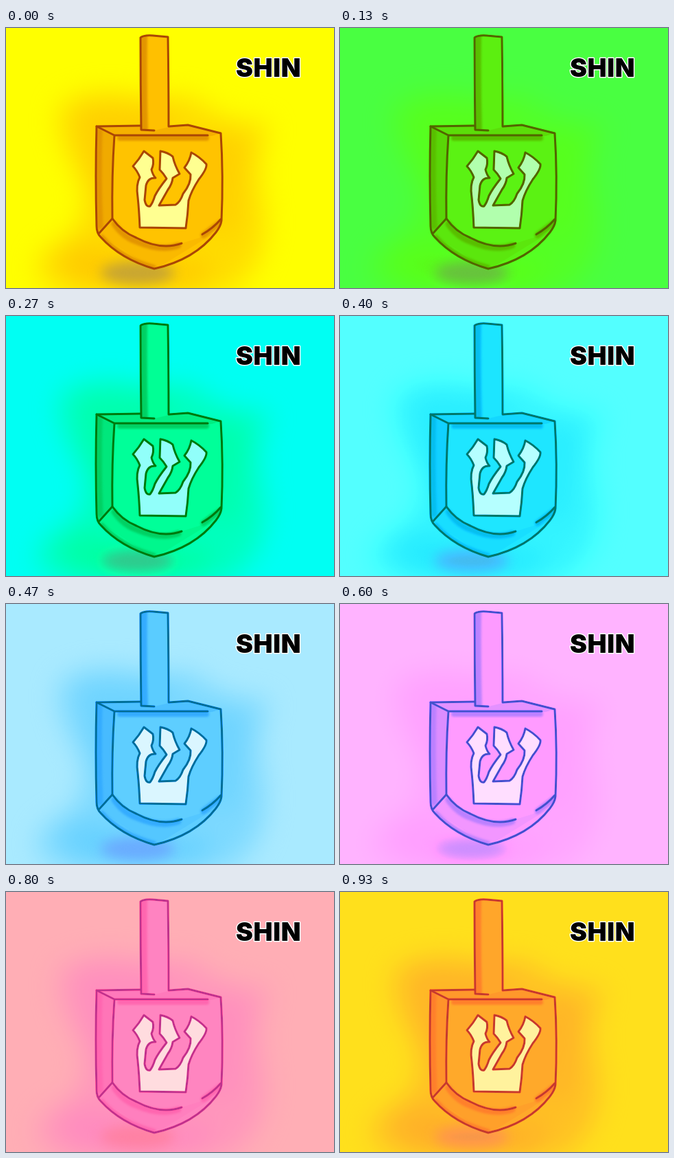
An HTML page for the animation above (0.99 s loop, 478 by 378 pixels).

```html
<!DOCTYPE html>
<html lang="en">
<head>
<meta charset="utf-8">
<title>Shin</title>
<style>
  html, body { margin: 0; width: 100%; height: 100%; overflow: hidden; background: #ff0; }
  svg { display: block; width: 478px; height: 378px; animation: hue 990ms step-end infinite; }
  .ink { fill: none; stroke: #aa4605; stroke-width: 3; stroke-linecap: round; stroke-linejoin: round; }
  .shade { fill: none; stroke: #e39500; stroke-linecap: round; }
  text { font: 900 37.5px Inter, "Open Sans", sans-serif; letter-spacing: .6px; stroke: #fff; stroke-width: 3px; stroke-linejoin: round; paint-order: stroke; }

  /* 24 degrees per step, on a 10 ms clock */
  @keyframes hue {
    0% { filter: hue-rotate(0deg); }
    7.0707% { filter: hue-rotate(24deg); }
    13.1313% { filter: hue-rotate(48deg); }
    20.202% { filter: hue-rotate(72deg); }
    27.2727% { filter: hue-rotate(96deg); }
    33.3333% { filter: hue-rotate(120deg); }
    40.404% { filter: hue-rotate(144deg); }
    47.4747% { filter: hue-rotate(168deg); }
    53.5353% { filter: hue-rotate(192deg); }
    60.606% { filter: hue-rotate(216deg); }
    67.6767% { filter: hue-rotate(240deg); }
    73.7373% { filter: hue-rotate(264deg); }
    80.808% { filter: hue-rotate(288deg); }
    87.8787% { filter: hue-rotate(312deg); }
    93.9393%, 100% { filter: hue-rotate(336deg); }
  }
</style>
</head>
<body>
<svg viewBox="0 0 478 378">
  <defs>
    <filter id="haze" x="-50%" y="-50%" width="200%" height="200%" color-interpolation-filters="sRGB"><feGaussianBlur stdDeviation="19"/></filter>
    <filter id="soft" filterUnits="userSpaceOnUse" x="0" y="0" width="478" height="378" color-interpolation-filters="sRGB"><feGaussianBlur stdDeviation="1.8"/></filter>
    <filter id="floor" x="-50%" y="-100%" width="200%" height="300%" color-interpolation-filters="sRGB"><feGaussianBlur stdDeviation="9"/></filter>
    <path id="body" d="M132 143 L196 142 L238 143 L265 141 L313 153 Q317 215 314 280 Q313 288 306 297 Q275 337 216 350 Q167 336 138 304 Q132 298 132 288 Q130 215 132 143Z"/>
    <path id="stem" d="M197 148 Q196 80 196 14 Q201 10 214 11 L236 13 Q237 80 237 144 L216 149Z"/>
    <clipPath id="inBody"><use href="#body"/></clipPath>
    <clipPath id="inStem"><use href="#stem"/></clipPath>
  </defs>

  <rect width="478" height="378" fill="#ff0"/>

  <g filter="url(#haze)">
    <path d="M80 112 Q130 82 200 100 L275 100 Q300 135 385 140 Q360 200 375 250 Q385 300 365 345 L330 385 L90 385 Q20 365 60 322 Q130 290 110 220 Q65 150 80 112Z" fill="#ffd200" opacity=".75"/>
    <path d="M70 325 Q130 300 190 340 L300 335 L285 390 L110 385Z" fill="#ffc000" opacity=".65"/>
    <path d="M300 150 L348 165 L335 290 L300 310Z" fill="#ffc300" opacity=".6"/>
    <path d="M105 110 L250 115 L150 280 L115 200Z" fill="#ffc300" opacity=".5"/>
  </g>
  <ellipse cx="192" cy="356" rx="54" ry="17" fill="#c8a532" filter="url(#floor)"/>

  <use href="#body" fill="#ffc300"/>
  <g clip-path="url(#inBody)">
    <path d="M130 142 L158 156 Q154 215 155 277 L134 298Z" fill="#f0aa00"/>
    <path d="M132 143 L265 141 L313 153 L300 157 L158 156Z" fill="#f5b000"/>
    <path d="M134 298 L155 277 Q168 296 190 305 Q226 324 256 313 L304 298 L216 352Z" fill="#fab900"/>
    <g filter="url(#soft)">
      <path class="shade" d="M136 150 Q134 220 137 288" stroke-width="9"/>
      <path class="shade" d="M166 160 H292" stroke-width="8"/>
      <path class="shade" d="M158 285 Q172 305 192 311 Q226 325 251 316" stroke-width="9"/>
      <path class="shade" d="M288 301 L312 283" stroke-width="9"/>
      <path class="shade" d="M140 303 Q170 335 216 347" stroke-width="5"/>
    </g>
  </g>

  <use href="#stem" fill="#ffc000"/>
  <g clip-path="url(#inStem)">
    <path class="shade" d="M200 12 Q199 80 201 150" stroke-width="12" filter="url(#soft)"/>
  </g>

  <g class="ink">
    <path d="M196 142 L132 143 Q130 215 132 288 Q132 298 138 304 Q167 336 216 350 Q275 337 306 297 Q313 288 314 280 Q317 215 313 153 L265 141 L238 143"/>
    <path d="M132 143 L158 156 H294 M158 156 Q154 215 155 277 L136 298"/>
    <path d="M155 277 Q168 296 190 305 Q226 324 256 313 M286 300 Q302 291 313 278"/>
    <path d="M216 149 L197 148 Q196 80 196 14 Q201 10 214 11 L236 13 Q237 80 237 143"/>
    <path fill="#ffff91" d="M201 179 L214 189 Q216 198 212 206 Q214 214 218 218 Q207 217 204 229 L202 250 Q204 261 210 259 Q214 254 217 244 Q222 234 234 219 Q230 212 224 206 L225 179 Q236 181 243 187 Q246 200 253 212 L243 218 Q242 227 236 235 L223 258 L247 257 Q254 253 258 241 Q270 226 269 213 L260 203 Q268 193 270 181 Q282 187 292 198 Q293 205 281 220 Q270 237 266 251 Q265 271 262 291 L195 290 Q194 265 192 246 Q189 228 195 217 Q191 207 185 201 Q194 191 201 179Z"/>
  </g>

  <text x="335" y="70.5">SHIN</text>
</svg>
</body>
</html>
```
